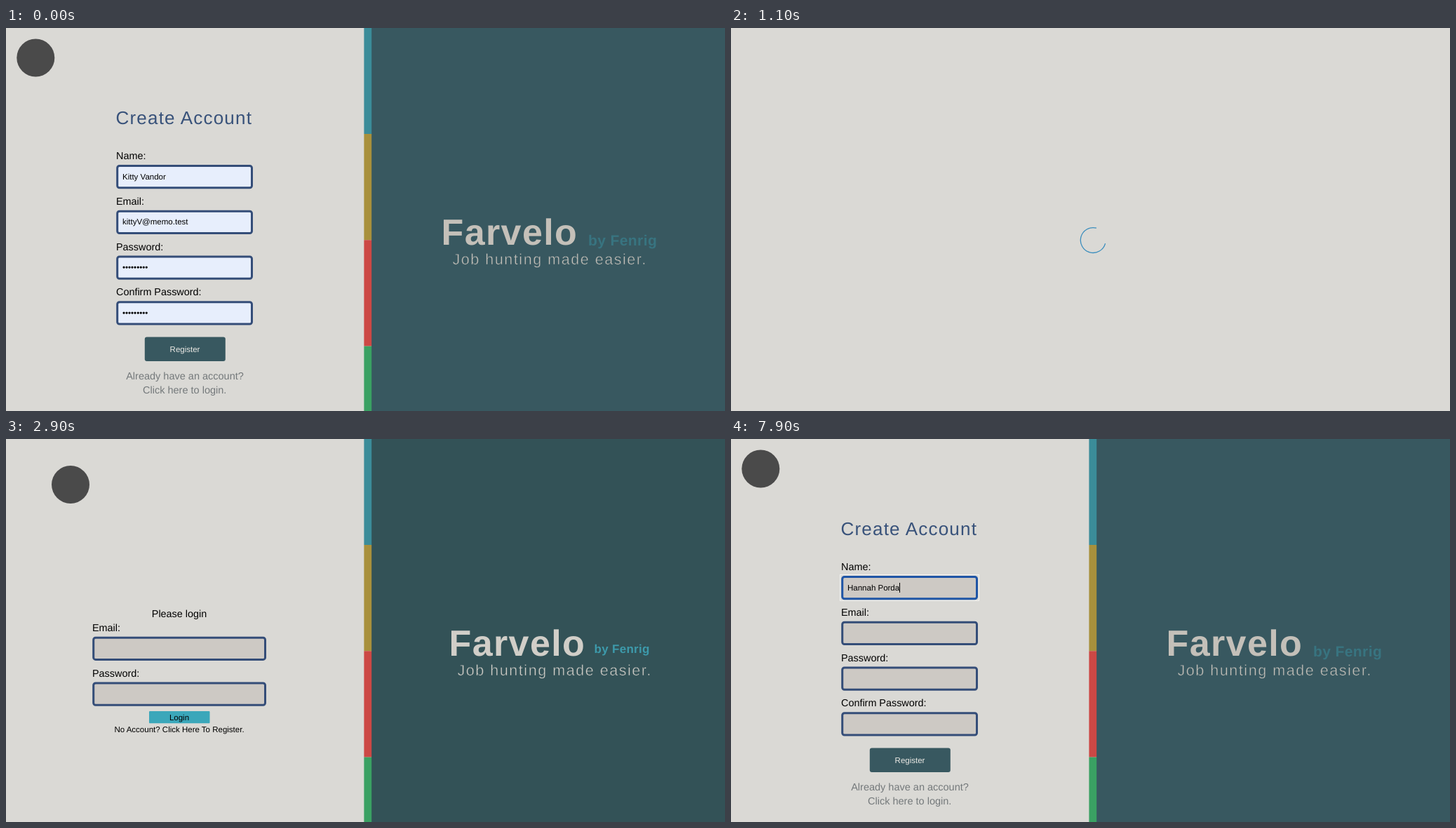
Animation, 1025 px wide and 546 px high, one loop 8000 ms. Source, as an HTML page:

```html
<!DOCTYPE html>
<html lang="en">
<head>
<meta charset="utf-8">
<title>Create Account</title>
<style>
  html, body { margin: 0; width: 100%; height: 100%; overflow: hidden; background: #dad9d5; }
  svg { display: block; width: 100%; height: 100%; }
  text { font: 14.4px "Liberation Sans", Arial, sans-serif; text-rendering: geometricPrecision; }
  .small { font-size: 11.5px; }
  .mid { text-anchor: middle; }
  .head { font-size: 26px; letter-spacing: 1.2px; fill: #38527a; }
  .note { font-size: 14.5px; fill: #74797b; }
  .field { fill: #cdc9c4; stroke: #344d78; stroke-width: 3; }
  .filled .field { fill: #e7eefc; }
  .field.focus { stroke: #1f55a6; outline: 1px solid #f2f2f0; outline-offset: 1px; }
  .brand { font-size: 52px; font-weight: bold; letter-spacing: 1.4px; }
  .by { font-weight: bold; letter-spacing: .4px; }
  .tag { font-size: 21.6px; letter-spacing: 1.5px; stroke-width: .5; }
  #register { --panel: #385860; --ink: #c4c0b9; --by: #387480; }
  #login { --panel: #335257; --ink: #d1cec8; --by: #3d9aab; }
  .panel { fill: var(--panel); }
  .brand, .tag { fill: var(--ink); }
  .tag { stroke: var(--panel); }
  .by { fill: var(--by); }
  #button { fill: #385860; }
  #button.hover { fill: #456c75; }
</style>
</head>
<body>
<svg viewBox="0 0 1025 546" preserveAspectRatio="none">
  <g id="register">
    <rect class="panel" x="521" width="504" height="546"/>
    <circle cx="42.3" cy="42.5" r="27" fill="#4a4a4a"/>
    <text class="head" x="156.5" y="137">Create Account</text>
    <g id="form"></g>
    <text id="error" class="small" x="157" y="443">Email has already been taken</text>
    <g id="foot">
      <rect id="button" x="197.8" y="440.5" width="115" height="34.5" rx="3"/>
      <text class="small mid" x="255" y="461.5" fill="#ebe9e4">Register</text>
      <text class="note mid" x="255" y="501">Already have an account?</text>
      <text class="note mid" x="254.7" y="521">Click here to login.</text>
    </g>
    <text class="brand" x="620.5" y="309">Farvelo</text>
    <text class="by" x="830" y="310" font-size="21" style="font-size:21px">by Fenrig</text>
    <text class="tag" x="636.5" y="336.5">Job hunting made easier.</text>
    <rect id="caret" y="205" width="1" height="14"/>
  </g>
  <g id="login">
    <rect class="panel" x="521" width="504" height="546"/>
    <circle cx="92" cy="65" r="27" fill="#4a4a4a"/>
    <text class="mid" x="247" y="253.5">Please login</text>
    <text x="123" y="273.5">Email:</text>
    <rect class="field" x="124.7" y="283.2" width="244.8" height="31.2" rx="3"/>
    <text x="123" y="338.5">Password:</text>
    <rect class="field" x="124.7" y="348" width="244.8" height="31.2" rx="3"/>
    <rect x="204" y="388" width="86.5" height="17.3" rx="1" fill="#3ba7ba"/>
    <text class="small mid" x="247" y="401">Login</text>
    <text class="small mid" x="247" y="418">No Account? Click Here To Register.</text>
    <text class="brand" x="631.5" y="309">Farvelo</text>
    <text class="by" x="838.5" y="304.5" style="font-size:17px;letter-spacing:.3px">by Fenrig</text>
    <text class="tag" x="643.5" y="336.5">Job hunting made easier.</text>
  </g>
  <g id="strip">
    <rect x="510.4" width="10.8" height="151" fill="#3b8c99"/>
    <rect x="510.4" y="151" width="10.8" height="151.3" fill="#a8903c"/>
    <rect x="510.4" y="302.3" width="10.8" height="151.3" fill="#cc4845"/>
    <rect x="510.4" y="453.6" width="10.8" height="93" fill="#3aa163"/>
  </g>
  <path id="spinner" d="M-14.6 14.6A20.7 20.7 0 1 1 14.6 14.6" fill="none" stroke="#3a8dbd" stroke-width="1.5"/>
</svg>
<script>
const LOOP = 8000, STEP = 100, PITCH = 64.75;
const $ = id => document.getElementById(id);
const show = (el, on) => el.style.display = on ? "" : "none";

const form = $("form");
form.innerHTML = ["Name:", "Email:", "Password:", "Confirm Password:"].map((label, i) => `
  <g transform="translate(0 ${i * PITCH})">
    <text x="157" y="187">${label}</text>
    <rect class="field" x="158.7" y="196.5" width="191.8" height="31.2" rx="3"/>
    <text class="small value" x="166" y="215.6"></text>
  </g>`).join("");
const fields = form.querySelectorAll(".field");
const values = form.querySelectorAll(".value");

const dots = "•".repeat(9);
const saved = ["Kitty Vandor", "kittyV@memo.test", dots, dots];
const typed = "Hannah Porda";
const keyTimes = [6200, 6400, 6700, 6800, 6900, 7000, 7200, 7300, 7500, 7600, 7800, 7900];

function draw(t) {
  const loading = t >= 600 && t < 1400;
  const login = t >= 2800 && t < 4700;
  const failed = t >= 1400 && t < 2800;
  show($("register"), !loading && !login);
  show($("login"), login);
  show($("strip"), !loading);
  show($("spinner"), loading);

  const turn = (t - 600) / 750 % 1;
  const scale = .8 + .2 * Math.abs(2 * turn - 1);
  $("spinner").setAttribute("transform", `translate(516.3 302.5) rotate(${360 * turn}) scale(${scale})`);

  form.classList.toggle("filled", t < 600);
  show($("error"), failed);
  $("foot").setAttribute("transform", `translate(0 ${failed ? 24.5 : 0})`);
  $("button").classList.toggle("hover", t >= 400 && t < 1500);

  const name = typed.slice(0, keyTimes.filter(k => k <= t).length);
  values.forEach((v, i) => v.textContent = t < 2800 ? saved[i] : i ? "" : name);
  fields[0].classList.toggle("focus", t >= 5500);
  fields[3].classList.toggle("focus", t >= 100 && t < 200);

  show($("caret"), t >= 5500 && (t < 6000 || t >= 6200));
  $("caret").setAttribute("x", Math.round(166 + (name ? values[0].getComputedTextLength() : 0)));
}

const start = performance.now();
function tick() {
  const t = (performance.now() - start) % LOOP;
  draw(Math.floor(t / STEP) * STEP);
  requestAnimationFrame(tick);
}
tick();
</script>
</body>
</html>
```
